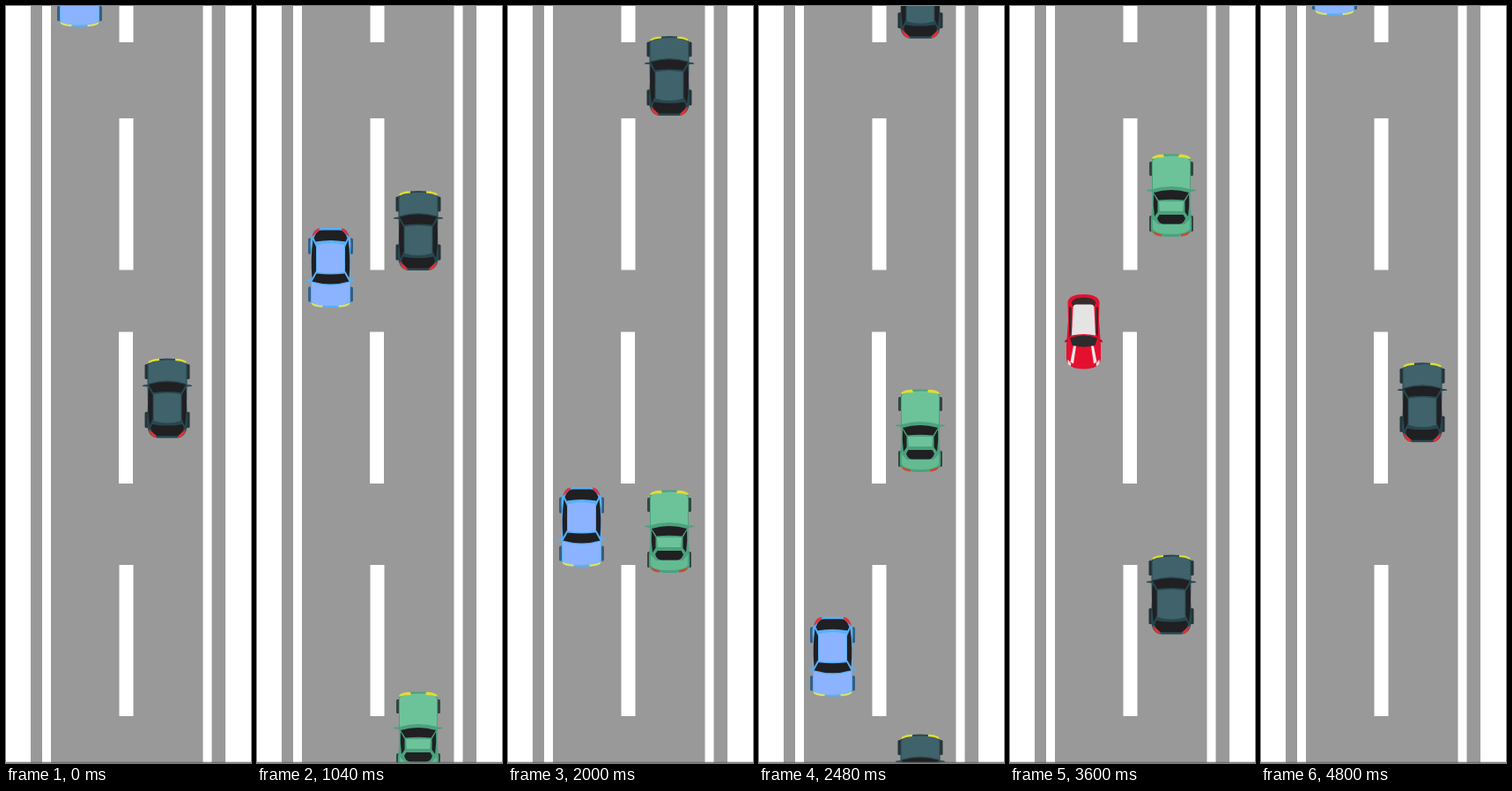
An HTML page that plays this animation: 278 by 856 pixels, repeating every 4880 ms.

```html
<!DOCTYPE html>
<html lang="en">
<head>
<meta charset="utf-8">
<title>Two-lane road</title>
<style>
  html, body { margin: 0; width: 100%; height: 100%; overflow: hidden; background: #fff; }
  svg { display: block; width: 278px; height: 856px; }
  .dark { --paint: #40626a; --trim: #28474e; --lamp: #e0dc35; --wheel: #253438; }
  .blue { --paint: #8bb3ff; --trim: #58b0fa; --lamp: #dbe36c; --wheel: #355f80; }
</style>
</head>
<body>
<svg viewBox="0 0 278 856">
  <defs>
    <!-- Every car is centred on x = 0 with its top edge at y = 0 -->
    <g id="sedanSide">
      <rect x="-25.5" y="7" width="4" height="17" rx="1.5" fill="var(--wheel)"/>
      <rect x="-25.5" y="61" width="4" height="18" rx="1.5" fill="var(--wheel)"/>
      <path d="M-22 32.5L-28.5 32L-27 30.5L-21 30Z" fill="var(--trim)"/>
    </g>
    <g id="sedanDetail">
      <path d="M-22 5Q-20 1-9 .8L-9 3Q-17 3.5-21 6Z" fill="var(--lamp)"/>
      <path d="M-21 34L-16.5 42V69L-20 77Q-23 56-21 34Z" fill="#201f22"/>
      <path d="M-21.5 80L-13 87.5L-12 90Q-19 90.5-21.5 80Z" fill="#d9343d"/>
    </g>
    <g id="sedan">
      <use href="#sedanSide"/><use href="#sedanSide" transform="scale(-1 1)"/>
      <path d="M-22.5 7Q-20 .5 0 .5T22.5 7V30Q21.5 52 23 72Q23 90.5 10 90.5H-10Q-23 90.5-23 72Q-21.5 52-22.5 30Z" fill="var(--trim)"/>
      <path d="M-21.5 8Q-19 3 0 2.5T21.5 8V29Q0 22-21.5 29Z" fill="var(--paint)"/>
      <path d="M-15.5 41Q0 38 15.5 41V71Q0 76-15.5 71Z" fill="var(--paint)"/>
      <path d="M-21 30Q0 24 21 30L16 39Q0 37-16 39Z" fill="#201f22"/>
      <path d="M-17 75Q0 78 17 75L19 79Q16 88 10 88H-10Q-16 88-19 79Z" fill="#201f22"/>
      <use href="#sedanDetail"/><use href="#sedanDetail" transform="scale(-1 1)"/>
    </g>

    <g id="coupeSide">
      <rect x="-25" y="9" width="4" height="16" rx="1.5" fill="#34463f"/>
      <rect x="-25" y="70" width="4" height="18" rx="1.5" fill="#34463f"/>
      <path d="M-22 43L-28 42L-27 40.5L-21 40.5Z" fill="#4ba27d"/>
    </g>
    <g id="coupeDetail">
      <path d="M-22 5Q-20 1-9 .8L-8 4Q-16 4-21 6Z" fill="#e0dc35"/>
      <path d="M-20 46L-15.5 54V66L-19 71Q-21 58-20 46Z" fill="#201f22"/>
      <path d="M-21 88L-11 91.5V93.5Q-20 93-21 88Z" fill="#c94a32"/>
    </g>
    <g id="coupe">
      <use href="#coupeSide"/><use href="#coupeSide" transform="scale(-1 1)"/>
      <path d="M-22 6Q-20 .5 0 .5T22 6V40L21.5 58L23 74V86Q22 94 0 94T-23 86V74L-21.5 58L-22 40Z" fill="#4ba27d"/>
      <path d="M-21 8Q-18 3 0 2.5T21 8V40Q0 34-21 40Z" fill="#6cc39a"/>
      <path d="M-21 74L-15 80H15L21 74V85Q18 91 0 91T-21 85Z" fill="#64bb92"/>
      <path d="M-14 54H14L13 65H-13Z" fill="#6cc39a"/>
      <path d="M-20 44Q0 38 20 44L14.5 52.5Q0 51-14.5 52.5Z" fill="#201f22"/>
      <path d="M-13.5 69H13.5L16 73Q14 79.5 9 79.5H-9Q-14 79.5-16 73Z" fill="#201f22"/>
      <use href="#coupeDetail"/><use href="#coupeDetail" transform="scale(-1 1)"/>
    </g>

    <g id="hatchSide">
      <path d="M-18 54L-21.5 55L-21 52.5L-18 51Z" fill="#b30d22"/>
      <path d="M-16.5 14L-14 16V44L-16.5 50Z" fill="#33292c"/>
      <path d="M-11.5 59H-8.5L-11.5 79L-15 77Z" fill="#f8e9ea"/>
      <path d="M-18 74L-14 79L-15 82L-18 79Z" fill="#f3dada"/>
    </g>
    <g id="hatch">
      <path d="M-18 9Q-16 .5 0 .5T18 9L17.5 30L19.5 58V74Q18 85 0 85T-19.5 74V58L-17.5 30Z" fill="#e5102f"/>
      <path d="M-14 10Q-12 4 0 4T14 10L12 14H-12Z" fill="#3a2a2d"/>
      <path d="M-15.5 50Q0 44 15.5 50L13 58Q0 62-13 58Z" fill="#2b2b2d"/>
      <path d="M-12 16Q-12 12-8 12H8Q12 12 12 16L13.5 47Q0 44-13.5 47Z" fill="#e4e4e4"/>
      <use href="#hatchSide"/><use href="#hatchSide" transform="scale(-1 1)"/>
    </g>
  </defs>

  <path d="M28 0H249V856H28Z" fill="#999"/>
  <path d="M41 0H51V856H41ZM223.5 0H233.5V856H223.5Z" fill="#fff"/>
  <path d="M128.5 0H144.5V41H128.5ZM128.5 127H144.5V298.5H128.5ZM128 368.5H144V540H128ZM128.5 632H144.5V803H128.5Z" fill="#fff"/>
  <g id="traffic"></g>
  <path d="M0 855.3H278" stroke="#666"/>
</svg>
<script>
const LOOP = 4880, STEP = 80;
const UP = 183, DOWN = 83.5;   // lane centres

// top: y of the car's upper edge at time 0; speed in px per ms
const cars = [
  { shape: 'sedan', paint: 'dark', lane: UP, top: 398, speed: -0.1822 },
  { shape: 'sedan', paint: 'dark', lane: UP, top: 1272.4, speed: -0.1812 },
  { shape: 'coupe', lane: UP, top: 1022, speed: -0.2375 },
  { shape: 'sedan', paint: 'blue', lane: DOWN, top: -67, speed: 0.3053, flip: 91 },
  { shape: 'sedan', paint: 'blue', lane: DOWN, top: -1545.5, speed: 0.3053, flip: 91 },
  { shape: 'hatch', lane: DOWN, top: -2461, speed: 0.774 },
];

const traffic = document.getElementById('traffic');
for (const car of cars) {
  car.node = document.createElementNS('http://www.w3.org/2000/svg', 'use');
  car.node.setAttribute('href', '#' + car.shape);
  if (car.paint) car.node.setAttribute('class', car.paint);
  traffic.append(car.node);
}

function draw() {
  // The picture advances in discrete steps; the small offset absorbs timer jitter
  const t = Math.floor(((performance.now() + 4) % LOOP) / STEP) * STEP;
  for (const { node, lane, top, speed, flip } of cars) {
    const y = top + speed * t;
    node.setAttribute('transform', flip
      ? `translate(${lane} ${y + flip}) rotate(180)`
      : `translate(${lane} ${y})`);
  }
  requestAnimationFrame(draw);
}
draw();
</script>
</body>
</html>
```
